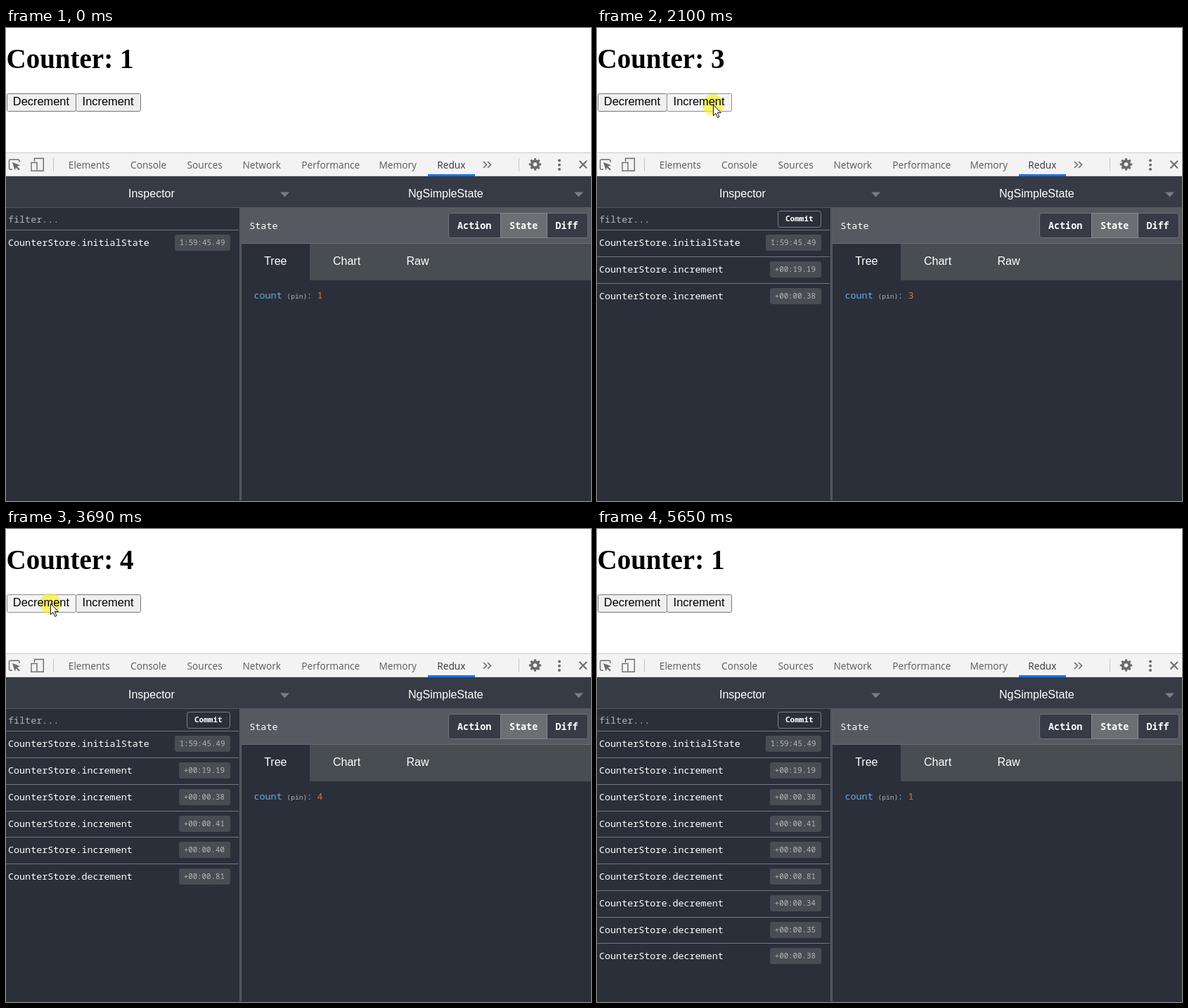
These frames come from a looping animation (832x673 px, 6.05 s). An HTML page:

```html
<!DOCTYPE html>
<html lang="en">
<head>
<meta charset="utf-8">
<title>Counter with state inspector</title>
<style>
  html, body { margin: 0; width: 100%; height: 100%; overflow: hidden; background: #fff; }
  svg { display: block; width: 832px; height: 673px; }
  text { white-space: pre; }
  .title { font: bold 39px "Liberation Serif", "Times New Roman", serif; }
  .sans { font: 16px "Liberation Sans", Arial, sans-serif; fill: #fff; }
  .btn { font: 16.4px "Liberation Sans", Arial, sans-serif; fill: #000; }
  .tool { font: 13.7px "Open Sans", "Noto Sans", sans-serif; fill: #5a5a5a; }
  .mono { font: 600 13.4px "Noto Sans Mono", "DejaVu Sans Mono", monospace; fill: #fff; }
  .name { font-weight: 500; }
  .plain { font-weight: 400; }
  .time { font-size: 10.8px; font-weight: 400; fill: #b6b6b6; }
  .line { stroke: #74787e; }
  .face { fill: #efefef; stroke: #767676; }
  .face.hover { fill: #e5e5e5; stroke: #4f4f4f; }
  .face.down { fill: #f5f5f5; stroke: #8d8d8d; }
</style>
</head>
<body>
<svg viewBox="0 0 832 673" xmlns="http://www.w3.org/2000/svg">
  <rect width="832" height="673" fill="#fff"/>
  <text class="title" x="0.5" y="57" id="title">Counter: 1</text>
  <rect class="face" id="dec" x="1.5" y="93.5" width="98" height="25" rx="2"/>
  <rect class="face" id="inc" x="99.5" y="93.5" width="92" height="25" rx="2"/>
  <circle id="press" r="15" fill="#f6ef38" opacity=".72"/>
  <text class="btn" x="9.8" y="110">Decrement</text>
  <text class="btn" x="108.6" y="110">Increment</text>

  <!-- tool bar -->
  <rect y="177" width="832" height="34" fill="#f3f3f3"/>
  <path d="M0 177.5H832" stroke="#cbcbcb"/>
  <path d="M0 210.5H832" stroke="#d6d6d6"/>
  <g fill="none" stroke="#6a6a6a" stroke-width="1.4">
    <path d="M9 201.3H6.2Q4.5 201.3 4.5 199.6V188.9Q4.5 187.2 6.2 187.2H17.2Q18.9 187.2 18.9 188.9V191"/>
    <path d="M9 191L20 195.2 15.8 197 19.8 201 18.2 202.6 14.2 198.6 12.6 202.6Z" fill="#6a6a6a" stroke="none"/>
    <path d="M40.5 190V185.5H53.3V203.3H45"/>
    <rect x="36" y="191.5" width="8" height="11.8"/>
    <path d="M679 190L683.5 194.5 679 199M685 190L689.5 194.5 685 199" stroke-width="1.6"/>
    <path d="M815.5 189L826 199.5M826 189L815.5 199.5" stroke-width="2"/>
    <circle cx="752.5" cy="194" r="4.8" stroke-width="4"/>
    <circle cx="752.5" cy="194" r="7.3" stroke-width="2.8" pathLength="16" stroke-dasharray="1 1" stroke-dashoffset=".5"/>
  </g>
  <g fill="#6a6a6a">
    <circle cx="787" cy="188.5" r="2"/><circle cx="787" cy="194.7" r="2"/><circle cx="787" cy="201" r="2"/>
  </g>
  <path d="M67.5 185V204M729.5 185V204" stroke="#c6c6c6"/>
  <g id="tabs"></g>

  <!-- inspector -->
  <rect y="211" width="832" height="462" fill="#2a2f3a"/>
  <rect y="211" width="832" height="45" fill="#363b46"/>
  <rect x="600" y="208" width="67" height="3" fill="#1a73e8"/>
  <path d="M0 255.5H832" stroke="#555a62"/>
  <path d="M390 233.5H403L396.5 240.5ZM808 233.5H821L814.5 240.5Z" fill="#797d84"/>
  <text class="sans" x="174" y="241">Inspector</text>
  <text class="sans" x="572" y="241">NgSimpleState</text>
  <rect x="335" y="256" width="497" height="51" fill="#565a60"/>
  <rect x="335" y="307" width="497" height="52" fill="#484d52"/>
  <path d="M335 306.5H832" stroke="#6a6e73"/>
  <rect x="335" y="307" width="97" height="52" fill="#2a2f3a"/>
  <rect x="332" y="256" width="3" height="416" fill="#5c6067"/>
  <path d="M333.5 256V672" stroke="#4a4f57"/>
  <text class="mono name" x="346.3" y="286">State</text>
  <rect x="629.5" y="263.5" width="198" height="35" rx="3" fill="#363b46" stroke="#70747a"/>
  <rect x="703.5" y="263.5" width="66" height="35" fill="#6b6f74" stroke="#85898e"/>
  <text class="mono" x="642" y="286">Action</text>
  <text class="mono" x="716" y="286">State</text>
  <text class="mono" x="781.5" y="286">Diff</text>
  <text class="sans" x="367.2" y="337">Tree</text>
  <text class="sans" x="465" y="337">Chart</text>
  <text class="sans" x="569.5" y="337">Raw</text>
  <g class="mono plain">
    <text x="352.5" y="385" fill="#66afdd">count</text>
    <text x="399.5" y="385" fill="#b6b6b6" font-size="9.6">(pin)</text>
    <text x="427.5" y="385" fill="#66afdd">:</text>
    <text x="442.5" y="385" fill="#f0702c" id="value">1</text>
    <text x="3" y="277" fill="#b2b4b8">filter...</text>
  </g>
  <path class="line" d="M0 287.5H331"/>
  <g id="commit">
    <rect x="257.5" y="260.5" width="61" height="23" rx="3" fill="#2a2f3a" stroke="#7c8087"/>
    <text class="mono" x="268" y="275" style="font-size:11px">Commit</text>
  </g>
  <g id="rows"></g>
  <path id="cursor" d="M.5 .5V15.8L4 12.5 6.6 18.5 9 17.5 6.4 11.6H11.4Z" fill="#fff" stroke="#111"/>
</svg>
<script>
  const LOOP = 6050;
  const $ = id => document.getElementById(id);

  // press time, release time, change, label of the delay
  const clicks = [
    [1360, 1490, 1, "19.19"], [1760, 1900, 1, "00.38"],
    [2100, 2300, 1, "00.41"], [2560, 2690, 1, "00.40"],
    [3360, 3490, -1, "00.81"], [3690, 3830, -1, "00.34"],
    [4030, 4180, -1, "00.35"], [4450, 4580, -1, "00.38"]
  ];

  // start, end, steps, from, to, easing
  const moves = [
    [200, 750, 9, [677, 622], [174, 115], p => 1 - (1 - p) ** 2.6],
    [820, 1030, 4, [172, 114], [165, 109], p => p],
    [2890, 3160, 5, [152, 110], [62, 106], p => 1 - (1 - p) ** 1.6],
    [3290, 3291, 2, [63, 106], [63, 106], p => p],
    [5110, 5580, 8, [64, 108], [767, 637], p => p ** 1.9]
  ];
  const GONE = 5650;

  const tabs = [["Elements", 88.8], ["Console", 177], ["Sources", 257.5], ["Network", 336.5],
    ["Performance", 420.3], ["Memory", 530.5], ["Redux", 613.3]];
  $("tabs").innerHTML = tabs.map(([name, x]) =>
    `<text class="tool" x="${x}" y="200"${name === "Redux" ? ' style="fill:#333"' : ""}>${name}</text>`).join("");

  function row(i, name, time) {
    const y = Math.round(306.25 + 37.77 * i);
    const x = time[0] === "+" ? 246 : 240;
    const rule = i ? `<path class="line" d="M0 ${y - 18.5}H331"/>` : "";
    return `<g>${rule}<text class="mono name" x="3" y="${y + 4}">CounterStore.${name}</text>
      <rect x="${x}" y="${y - 12}" width="${319 - x}" height="23" rx="3" fill="#484d53"/>
      <text class="mono time" x="${x + 6.7}" y="${y + 3}">${time}</text></g>`;
  }
  $("rows").innerHTML = row(0, "initialState", "1:59:45.49") +
    clicks.map(([, , d, s], i) => row(i + 1, d > 0 ? "increment" : "decrement", "+00:" + s)).join("");
  const rows = [...$("rows").children];

  function pointer(t) {
    const move = moves.filter(m => t >= m[0]).pop();
    if (!move || t >= GONE) return null;
    const [start, end, steps, a, b, ease] = move;
    const k = Math.floor((t - start) / (end - start) * (steps - 1) + 0.1);
    const p = ease(Math.min(1, k / (steps - 1)));
    return a.map((v, i) => Math.round(v + (b[i] - v) * p));
  }

  function draw(t) {
    const done = clicks.filter(c => t >= c[1]);
    const count = done.reduce((sum, c) => sum + c[2], 1);
    const down = clicks.some(c => t >= c[0] && t < c[1]);
    const pos = pointer(t);

    $("title").textContent = "Counter: " + count;
    $("value").textContent = count;
    rows.forEach((r, i) => r.style.display = i <= done.length ? "" : "none");
    $("commit").style.display = t >= 1560 ? "" : "none";

    const face = (id, left, right) => {
      const over = pos && pos[0] >= left && pos[0] < right && pos[1] >= 93 && pos[1] < 119;
      $(id).setAttribute("class", "face" + (over ? down ? " down" : " hover" : ""));
    };
    face("dec", 1, 99);
    face("inc", 99, 192);

    $("cursor").style.display = pos ? "" : "none";
    $("press").style.display = down ? "" : "none";
    if (pos) {
      $("cursor").setAttribute("transform", `translate(${pos})`);
      $("press").setAttribute("transform", `translate(${pos})`);
    }
  }

  function tick() {
    draw(performance.now() % LOOP);
    requestAnimationFrame(tick);
  }
  tick();
</script>
</body>
</html>
```
